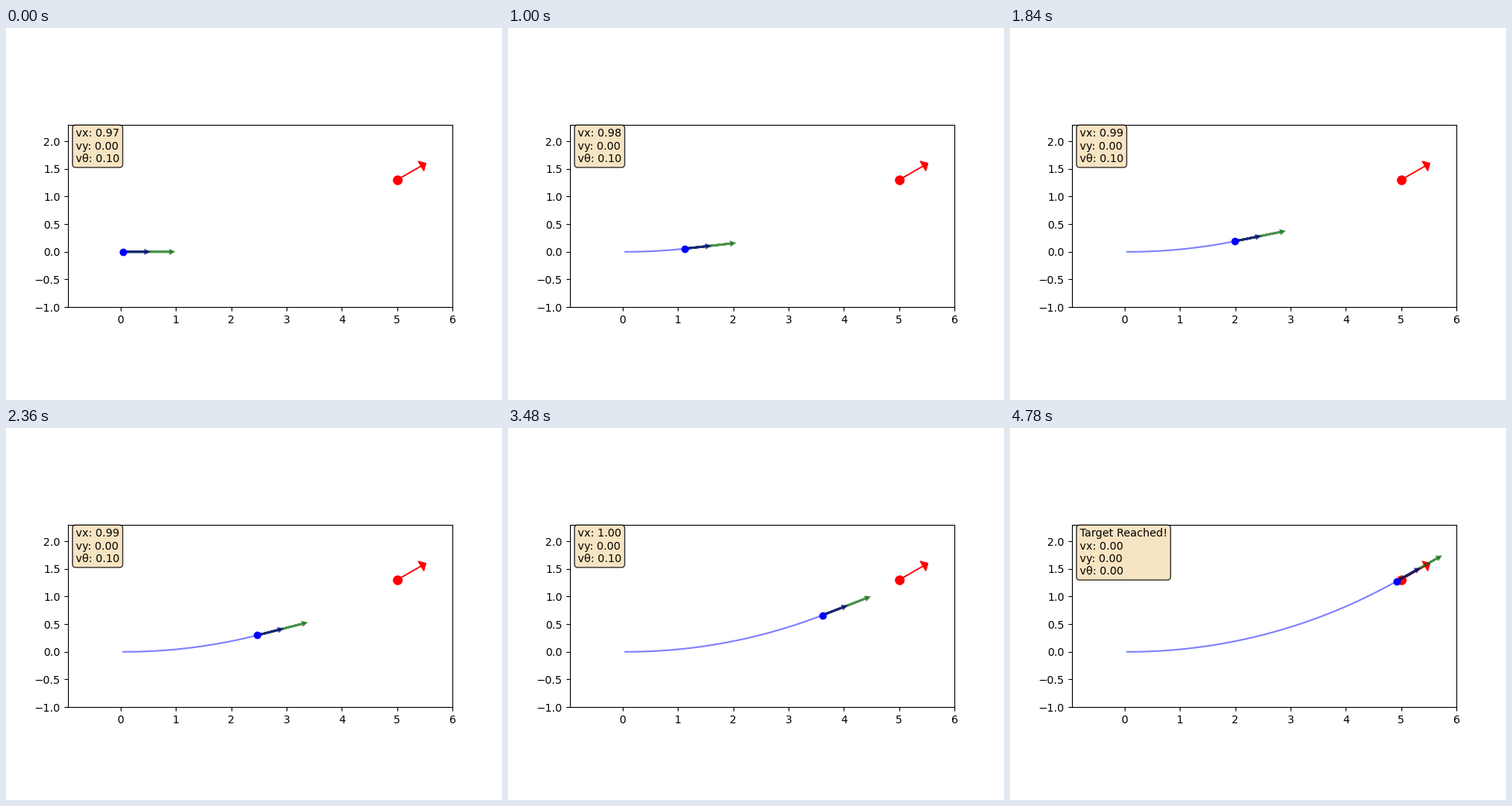
A matplotlib script for the animation above (4800 ms loop, 640x480 px).

```python
import numpy as np
import matplotlib.pyplot as plt
from matplotlib.animation import FuncAnimation

TICK = 20            # ms per animation frame
LOOP = 4800          # ms
STEPS = 104          # simulation steps in one loop
DT = 0.05
TURN = 0.1           # rad/s

# Simulate the drive: speed eases up to 1 while the heading turns steadily.
# Each step moves along the heading reached before it.
steps = np.arange(STEPS)
speed = 1 - 0.0326 * (1 - steps / (STEPS - 1)) ** 2
heading = TURN * DT * steps
course = TURN * DT * np.maximum(steps - 1, 0)
path_x = np.cumsum(DT * speed * np.cos(course))
path_y = np.cumsum(DT * speed * np.sin(course))

plt.rcParams["font.family"] = "DejaVu Sans"
fig, ax = plt.subplots(figsize=(6.4, 4.8), dpi=100)
ax.set_xlim(-0.95, 6)
ax.set_ylim(-1, 2.3)
ax.set_aspect("equal")
ax.set_xticks(range(7))
ax.set_yticks(np.arange(-1, 2.1, 0.5))

# Goal pose
goal_angle = np.pi / 6
ax.arrow(5, 1.3, 0.5 * np.cos(goal_angle), 0.5 * np.sin(goal_angle),
         head_width=0.2, head_length=0.1, color="red", zorder=1.5)
ax.plot(5, 1.3, "o", color="red", markersize=8, zorder=2)


def make_arrow(color, zorder):
    return ax.arrow(0, 0, 1, 0, head_width=0.05, head_length=0.05, lw=2,
                    color=color, alpha=0.7, zorder=zorder)


trail, = ax.plot([], [], color="blue", alpha=0.5, lw=1.5, zorder=2.1)
arrows = [(make_arrow("darkgreen", 2.2), 0.85), (make_arrow("navy", 2.3), 0.4)]
robot, = ax.plot([], [], "o", color="blue", markersize=6, zorder=2.4)
status = ax.text(0.02, 0.98, "", transform=ax.transAxes, va="top", fontsize=10,
                 bbox=dict(boxstyle="round", facecolor="wheat", alpha=0.8))


def step_at(ms):
    """Every 140 ms holds three steps, shown for 20, 100 and 20 ms."""
    cycle, rest = divmod(ms, 140)
    return 3 * cycle + (rest >= 20) + (rest >= 120)


def status_text(k):
    done = k == STEPS - 1
    vx, turn = (0, 0) if done else (speed[k], TURN)
    title = "Target Reached!\n" if done else ""
    return f"{title}vx: {vx:.2f}\nvy: 0.00\nvθ: {turn:.2f}"


def update(frame):
    k = step_at(frame * TICK)
    x, y, angle = path_x[k], path_y[k], heading[k]
    trail.set_data(path_x[:k + 1], path_y[:k + 1])
    robot.set_data([x], [y])
    for arrow, length in arrows:
        arrow.set_data(x=x, y=y, dx=length * np.cos(angle),
                       dy=length * np.sin(angle))
    status.set_text(status_text(k))


anim = FuncAnimation(fig, update, frames=LOOP // TICK, interval=TICK,
                     repeat=True, repeat_delay=0)
plt.show()
```
